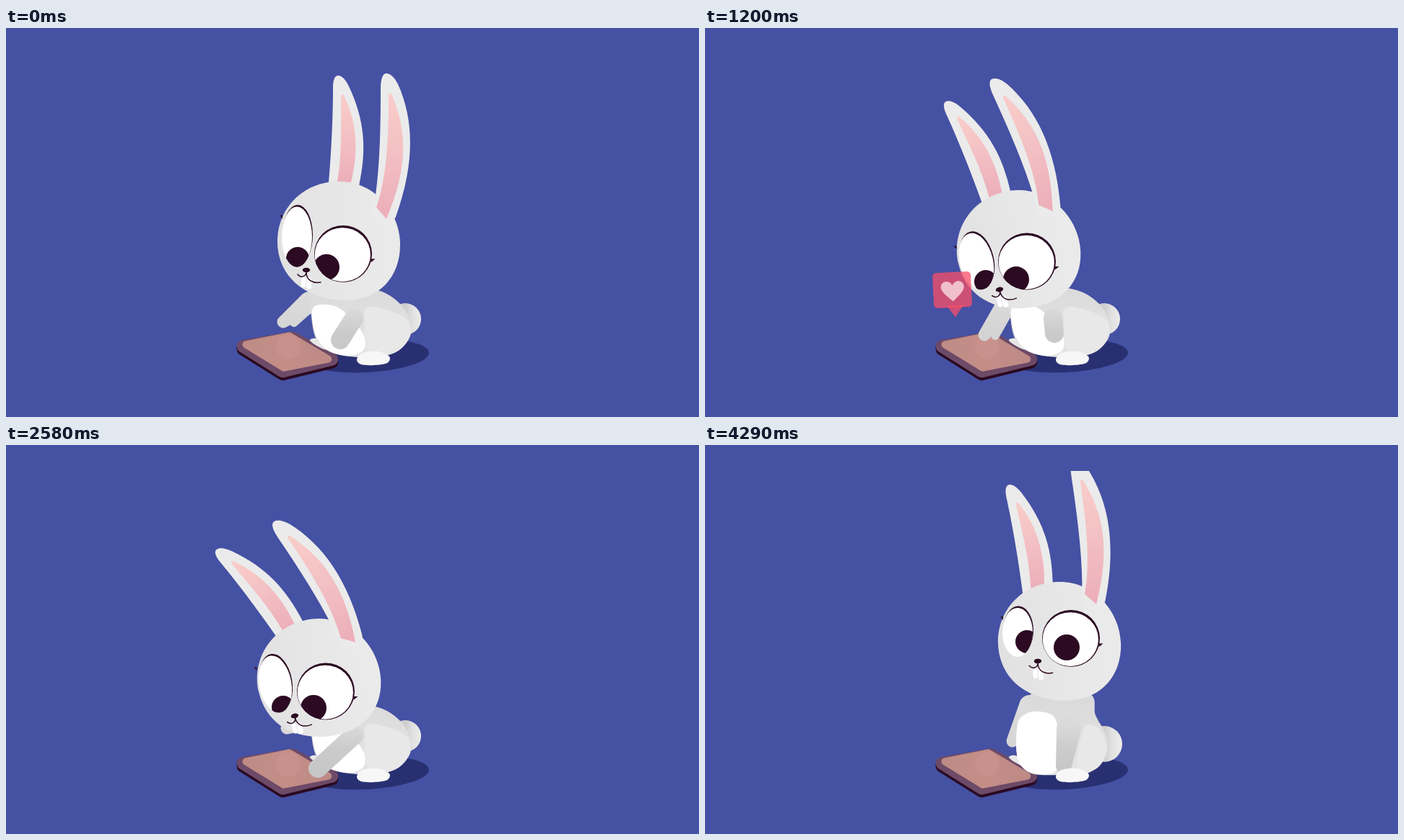
Animation of 960x540 px, one loop 4320 ms. Source, as an HTML page with a canvas:

```html
<!DOCTYPE html>
<html lang="ja">
<head>
<meta charset="utf-8">
<title>Rabbit and tablet</title>
<style>
html, body { margin: 0; width: 100%; height: 100%; overflow: hidden; background: #4551a3; }
canvas { display: block; width: 960px; height: 540px; }
</style>
</head>
<body>
<canvas id="stage" width="960" height="540"></canvas>
<script>
const ctx = document.getElementById('stage').getContext('2d');
const LOOP = 4320, INK = '#2b0a22', RED = '#fa4f68';

// Poses: [x, y, angle...] of each moving part
const rest = {
  head: [461, 296, 0], ear: [520, 257, 0], farEar: [469, 213, 0],
  eye: [467, 313.5], farEye: [403, 290, 0, 42], pupil: [444, 332], farPupil: [404, 320],
  nose: [416, 336], sit: [0], hand: [463, 433], farHand: [384, 408]
};
const tap = { ...rest, farHand: [382, 421] };
const lean = {
  head: [434, 308, -13], ear: [472, 250, -24.6], farEar: [403, 232, -24.5],
  eye: [446, 324], farEye: [376, 324, -14, 40], pupil: [431, 349], farPupil: [389, 352],
  nose: [408, 363], sit: [0], hand: [484, 424], farHand: [387, 426]
};
const lift = {
  head: [438, 314, -13], ear: [479, 260, -29.8], farEar: [401, 240, -34.5],
  eye: [449, 331], farEye: [379, 324, -11, 41], pupil: [431, 353], farPupil: [389, 354],
  nose: [406, 366], sit: [0], hand: [457, 437], farHand: [389, 410]
};
const pat = {
  head: [433, 324, -13], ear: [474, 271, -34], farEar: [392, 253, -39.5],
  eye: [443, 342], farEye: [373, 332, -10, 40], pupil: [426, 365], farPupil: [384, 364],
  nose: [400, 376], sit: [0], hand: [432, 449], farHand: [389, 393]
};
const low = { ...pat, head: [431, 329, -13], ear: [472, 276, -38], farEar: [389, 258, -46],
  eye: [441, 347], farEye: [371, 337, -10, 40], pupil: [424, 370], farPupil: [382, 369],
  nose: [398, 381], hand: [478, 430], farHand: [388, 426] };
const upright = {
  head: [490, 274, 14], ear: [560, 249, 23], farEar: [519, 196, 11.7],
  eye: [507, 274], farEye: [439, 245, 18, 36], pupil: [483, 281], farPupil: [425, 256],
  nose: [447, 288], sit: [1], hand: [497, 445], farHand: [426, 411]
};
const flung = { ...upright, ear: [563, 254, 72], farEar: [523, 200, 58] };
const back = { ...upright, ear: [562, 252, 42], farEar: [521, 198, 32] };
const front = {
  head: [491, 273, -2], ear: [534, 214, -8.5], farEar: [461, 197, -12.3],
  eye: [507, 268.5], farEye: [433, 260, 0, 34], pupil: [501, 281], farPupil: [446, 273],
  nose: [461, 300], sit: [1], hand: [497, 445], farHand: [426, 411]
};

const keys = [[0, rest], [240, rest], [420, tap], [520, rest], [760, flung],
  [960, back], [1085, back], [1200, lean], [1310, low], [1455, lift], [1550, low]];
for (let t = 1650; t < 2500; t += 290) keys.push([t, lift], [t + 60, pat], [t + 175, low]);
keys.push([2510, lift], [2580, pat], [2680, low], [3080, upright], [3510, upright],
  [3960, front], [LOOP, front]);

// Heart: rise, opacity.  Label: scale, opacity
const heartKeys = [[0, [56, 0]], [330, [56, 0]], [420, [26, .65]], [540, [0, 1]], [780, [0, 1]],
  [900, [-8, 0]], [1100, [40, 0]], [1200, [-4.5, .75]], [1320, [-3, 1]], [1650, [0, 1]],
  [1860, [0, 1]], [1980, [-8, 0]], [LOOP, [-8, 0]]];
const labelKeys = [[0, [0, 0]], [2600, [0, 0]], [2715, [1.1, 1]], [2830, [.98, 1]], [2900, [1, 1]],
  [3500, [1, 1]], [3640, [.4, 0]], [LOOP, [0, 0]]];

const mix = (a, b, u) => a + (b - a) * u;
const mixAll = (a, b, u) => a.map((v, i) => mix(v, b[i], u));
function mixPose(a, b, u) {
  const p = {};
  for (const k in a) p[k] = mixAll(a[k], b[k], u);
  return p;
}
function sample(table, t, blend) {
  let i = 0;
  while (i < table.length - 2 && t >= table[i + 1][0]) i++;
  const [t0, a] = table[i], [t1, b] = table[i + 1];
  const u = Math.min(1, (t - t0) / (t1 - t0));
  return blend(a, b, u * u * (3 - 2 * u));
}

const shapes = {
  head: 'M-85 0C-85 -45 -50 -83 0 -83C50 -83 85 -40 85 5C85 50 55 82 10 82C-45 82 -85 50 -85 0Z',
  ear: 'M-8 -25C-2 -70 -1 -120 -1 -172C-1 -187 2 -194 7 -194C14 -194 20 -185 23 -179C45 -130 47 -70 20 5C15 18 -10 18 -12 0Z',
  earPink: 'M-7 -8C8 -50 10 -110 10 -160C10 -168 13 -168 15 -163C35 -115 38 -65 7 8Z',
  farEar: 'M-24 25C-18 -40 -16 -90 -16 -130C-16 -142 -13 -147 -9 -147C-3 -147 2 -140 6 -132C28 -85 31 -45 20 6L14 30Z',
  farPink: 'M-14 20L-10 0C-3 -40 -5 -80 -5 -115C-5 -123 -2 -123 0 -117C18 -80 19 -40 9 1L4 20Z',
  mouth: 'M-12 6C-8 11 -1 10 0 3C0 14 9 19 20 17',
  heart: 'M0 15C-5 10 -16 2 -16 -5C-16 -14 -4 -16 0 -7C4 -16 16 -14 16 -5C16 2 5 10 0 15Z'
};
for (const k in shapes) shapes[k] = new Path2D(shapes[k]);

function grad(x0, y0, x1, y1, ...colors) {
  const g = ctx.createLinearGradient(x0, y0, x1, y1);
  colors.forEach((c, i) => g.addColorStop(i / (colors.length - 1), c));
  return g;
}
function fill(path, color) {
  ctx.fillStyle = color;
  ctx.fill(path);
}
function oval(x, y, rx, ry = rx, deg = 0) {
  const p = new Path2D();
  p.ellipse(x, y, rx, ry, deg * Math.PI / 180, 0, Math.PI * 2);
  return p;
}
function at(x, y, deg, draw) {
  ctx.save();
  ctx.translate(x, y);
  ctx.rotate(deg * Math.PI / 180);
  draw();
  ctx.restore();
}
// Smooth closed curve through points
function blob(pts) {
  const p = new Path2D(), n = pts.length, get = i => pts[(i + n) % n];
  p.moveTo(...pts[0]);
  for (let i = 0; i < n; i++) {
    const [a, b, c, d] = [get(i - 1), get(i), get(i + 1), get(i + 2)];
    p.bezierCurveTo(b[0] + (c[0] - a[0]) / 6, b[1] + (c[1] - a[1]) / 6,
      c[0] - (d[0] - b[0]) / 6, c[1] - (d[1] - b[1]) / 6, ...c);
  }
  return p;
}
const morph = (a, b, u) => blob(a.map((p, i) => mixAll(p, b[i], u)));
// Rounded polygon
function panel(pts, r) {
  const p = new Path2D(), n = pts.length, last = pts[n - 1];
  p.moveTo((last[0] + pts[0][0]) / 2, (last[1] + pts[0][1]) / 2);
  pts.forEach((q, i) => p.arcTo(...q, ...pts[(i + 1) % n], r));
  p.closePath();
  return p;
}
function limb([x0, y0], r0, [x1, y1], r1, color) {
  const a = Math.atan2(y1 - y0, x1 - x0), h = Math.PI / 2;
  const p = new Path2D();
  p.arc(x0, y0, r0, a + h, a - h);
  p.arc(x1, y1, r1, a - h, a + h);
  p.closePath();
  fill(p, color);
}

const bodyLow = [[425, 372], [470, 360], [515, 364], [545, 382], [560, 408], [558, 432], [535, 452], [490, 457], [450, 450], [430, 432], [423, 400]];
const bodyUp = [[440, 362], [465, 340], [532, 345], [541, 375], [555, 402], [556, 428], [538, 451], [490, 458], [450, 455], [434, 435], [431, 400]];
const bellyLow = [[424, 393], [436, 384], [460, 388], [482, 408], [496, 428], [495, 447], [475, 455], [447, 448], [430, 428]];
const bellyUp = [[433, 388], [445, 373], [463, 370], [484, 378], [490, 405], [491, 440], [480, 456], [450, 454], [433, 435]];
const hipLow = [[500, 388], [530, 392], [556, 405], [560, 425], [545, 447], [515, 456], [498, 440], [497, 410]];
const hipUp = [[527, 390], [540, 390], [553, 405], [556, 425], [545, 447], [520, 457], [516, 435], [520, 410]];
const foot = blob([[486, 460], [494, 451], [515, 449], [531, 456], [528, 465], [510, 468], [492, 467]]);
const slab = [[304, 437], [398, 421], [476, 463], [382, 486]];
const screen = panel([[319, 437], [393, 422], [460, 462], [384, 477]], 5);

function drawTablet() {
  for (let d = 4; d > 0; d--) fill(panel(slab.map(([x, y]) => [x, y + d]), 9), INK);
  fill(panel(slab, 9), '#6d4a67');
  fill(screen, grad(320, 0, 458, 0, '#bd8b86', '#c48e87', '#bd8985'));
  fill(oval(391, 443, 17), '#c9918b');
}

function drawBody(p) {
  const s = p.sit[0], [hx, hy] = p.farHand;
  const ty = mix(404, 415, s), tr = mix(22, 25, s);
  fill(oval(553, ty, tr), grad(553, 0, 576, 0, '#cecece', '#e2e2e2', '#ececec'));
  fill(blob([[421, 434], [430, 431], [444, 439], [455, 448], [438, 445]]), '#e8e8e8');
  const shoulder = mixAll([420, 381], [450, 362], s);
  const shade = grad(0, 365, 0, 430, '#dcdcdc', '#d3d3d3');
  limb(shoulder, 15, [hx, hy], 8.5, shade);
  limb(shoulder, 13, [hx + 15 * (1 - s), hy + 1], 6, shade);
  fill(morph(bodyLow, bodyUp, s), grad(0, 350, 0, 455, '#dadada', '#e4e4e4'));
  fill(morph(hipLow, hipUp, s), '#e8e8e8');
  fill(morph(bellyLow, bellyUp, s), '#ffffff');
  limb(mixAll([482, 403], [504, 394], s), mix(13, 17, s), p.hand, mix(13, 11, s),
    grad(0, 390, 0, 455, '#dadada', '#cbcbcb', '#c6c6c6'));
  fill(foot, '#f7f7f7');
}

function drawEar([x, y, deg], outer, pink, top) {
  at(x, y, deg, () => {
    fill(shapes[outer], '#ebebeb');
    fill(shapes[pink], grad(0, top, 0, 0, '#f9cdc9', '#f3c0c3', '#ecafba'));
  });
}

function drawPupil(white, [x, y], r) {
  ctx.save();
  ctx.clip(white);
  fill(oval(x, y, r), INK);
  ctx.restore();
}

function drawLash(x, y, dir) {
  fill(new Path2D(`M${x} ${y - 2}L${x + 6 * dir} ${y - 2}L${x} ${y + 3}Z`), INK);
}

function drawFace(p) {
  const [ex, ey] = p.eye, [fx, fy, tilt, ry] = p.farEye;
  const rx = 21 + Math.max(0, -tilt) / 7;
  fill(oval(fx + 1, fy - 2.5, rx, ry, tilt), INK);
  const farWhite = oval(fx, fy, rx, ry, tilt);
  fill(farWhite, '#ffffff');
  drawPupil(farWhite, p.farPupil, 16);
  at(fx, fy, tilt, () => drawLash(1 - rx, 14 - ry, -.6));

  fill(oval(ex, ey, 40, 39.5), INK);
  const white = oval(ex - .7, ey + 1.2, 38.6, 37.5);
  fill(white, '#ffffff');
  drawPupil(oval(ex, ey, 40, 39.5), p.pupil, 18);
  drawLash(ex + 38.5, ey + 9, 1);

  at(p.nose[0], p.nose[1], p.head[2], () => {
    ctx.fillStyle = '#ffffff';
    ctx.beginPath();
    ctx.roundRect(-7, 8, 6, 16, 2.5);
    ctx.roundRect(0, 10, 7, 16, 2.5);
    ctx.fill();
    ctx.strokeStyle = INK;
    ctx.lineWidth = 1.5;
    ctx.lineCap = 'round';
    ctx.stroke(shapes.mouth);
    fill(oval(0, 0, 5.2, 3.3), INK);
  });
}

function drawRabbit(p) {
  ctx.save();
  ctx.beginPath();
  ctx.rect(0, 36, 960, 504);
  ctx.clip();
  drawBody(p);
  drawEar(p.farEar, 'farEar', 'farPink', -120);
  at(...p.head, () => fill(shapes.head, grad(-85, 0, 60, 0, '#e1e1e1', '#e6e6e6', '#eaeaea')));
  drawEar(p.ear, 'ear', 'earPink', -167);
  drawFace(p);
  ctx.restore();
}

function drawBubble(x, y, w, h, tail) {
  at(x, y, -2.8, () => {
    ctx.fillStyle = RED;
    ctx.beginPath();
    ctx.roundRect(-w / 2, -h / 2, w, h, 5);
    ctx.fill();
  });
  fill(new Path2D(tail), RED);
}

function drawHeart([rise, alpha]) {
  if (!alpha) return;
  ctx.save();
  ctx.globalAlpha = alpha;
  ctx.translate(0, rise);
  drawBubble(342.5, 368, 53, 49, 'M335 390L347 406L358 389Z');
  at(343, 369, -3, () => fill(shapes.heart, '#fde6ea'));
  ctx.restore();
}

function drawLabel([scale, alpha]) {
  if (!alpha) return;
  ctx.save();
  ctx.globalAlpha = alpha;
  ctx.translate(347, 295);
  ctx.scale(scale, scale);
  ctx.translate(-347, -295);
  drawBubble(313, 250.5, 150, 64, 'M335 282L347 295L357 281Z');
  at(255, 264, -2.7, () => {
    ctx.fillStyle = '#ffffff';
    ctx.font = 'bold 27px "Noto Sans CJK JP", "Noto Sans CJK", sans-serif';
    ctx.letterSpacing = '2px';
    ctx.fillText('好きLike', 0, 0);
  });
  ctx.restore();
}

function draw(t) {
  ctx.fillStyle = '#4551a3';
  ctx.fillRect(0, 0, 960, 540);
  fill(oval(500, 455, 86, 23, -3), '#293072');
  drawTablet();
  drawRabbit(sample(keys, t, mixPose));
  drawHeart(sample(heartKeys, t, mixAll));
  drawLabel(sample(labelKeys, t, mixAll));
}

const start = performance.now();
function tick(now) {
  draw(Math.max(0, now - start) % LOOP);
  requestAnimationFrame(tick);
}
draw(0);
requestAnimationFrame(tick);
</script>
</body>
</html>
```
